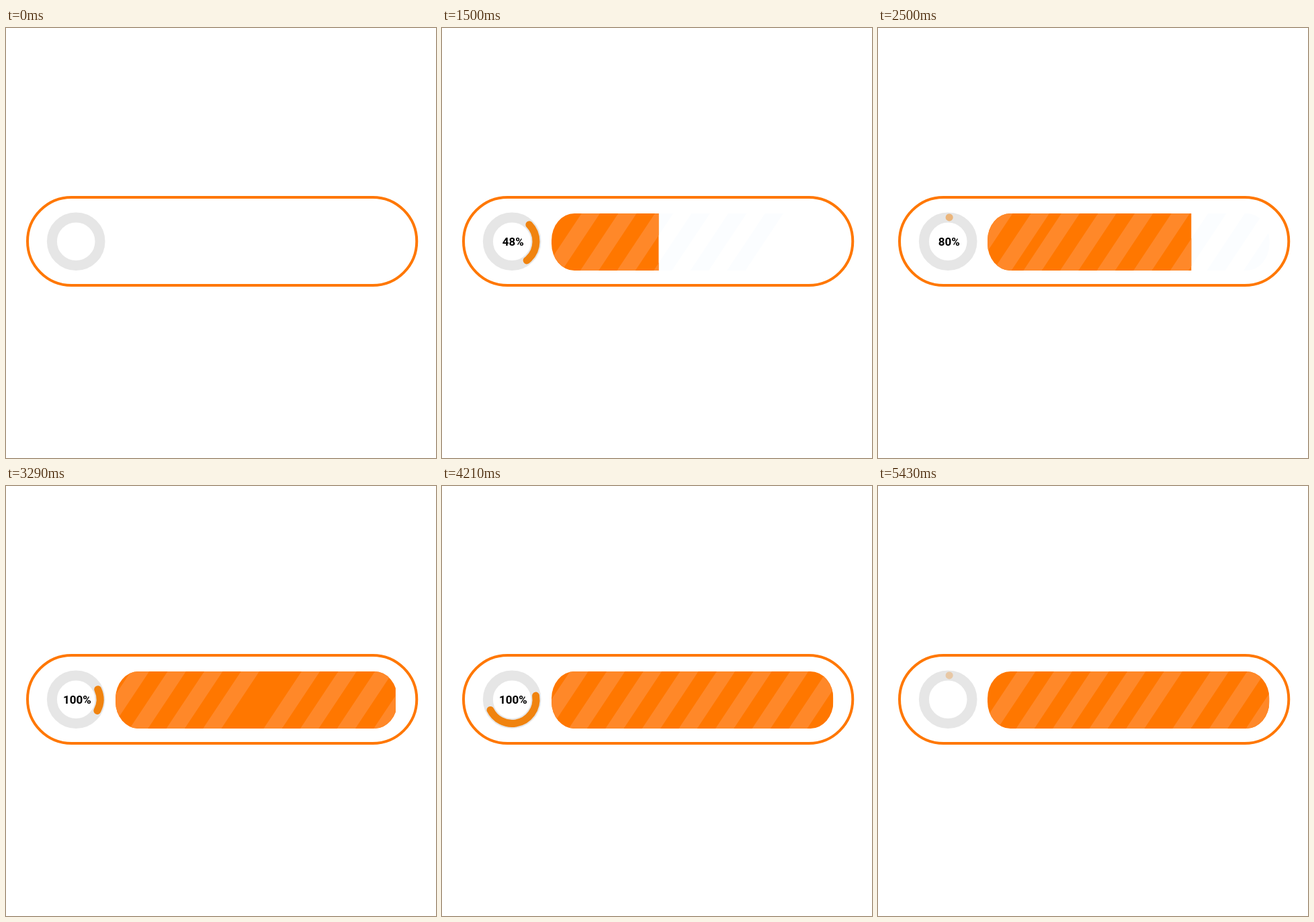
Animation, 640 px wide and 640 px high, one loop 5.5 s. Source, as an HTML page with a canvas:

```html
<!DOCTYPE html>
<html lang="en">
<head>
<meta charset="utf-8">
<title>Loading bar</title>
<style>
  html, body { margin: 0; width: 100%; height: 100%; overflow: hidden; background: #fff; }
  canvas { display: block; width: 640px; height: 640px; }
</style>
</head>
<body>
<canvas id="stage" width="640" height="640"></canvas>
<script>
const ctx = document.getElementById('stage').getContext('2d');
const LOOP = 5500, SPIN = 3000;
const ORANGE = '#ff7700';
const BAR = { x: 163, y: 276, w: 419.5, h: 85 };
const RING = { x: 104.2, y: 317.7, r: 35.8 };
const STRIPE = { step: 54.6, width: 27.3, slant: 56.5, count: 9 };

// Top right end of each stripe group over time: [ms, x]
const GROUPS = [
  [[0, 200], [1500, 508], [2500, 737], [3290, 904]],
  [[2500, 255], [3290, 377], [4210, 600], [4930, 800], [5430, 959]],
  [[4930, 273], [5430, 453]]
];

const clamp = v => Math.min(1, Math.max(0, v));
const ease = (t, a, b) => (1 - Math.cos(Math.PI * clamp((t - a) / (b - a)))) / 2;

// Linear between points, continued beyond both ends
function track(points, t) {
  let i = 1;
  while (i < points.length - 1 && t > points[i][0]) i++;
  const [t0, x0] = points[i - 1], [t1, x1] = points[i];
  return x0 + (x1 - x0) * (t - t0) / (t1 - t0);
}

function barPath() {
  const corner = { x: 34, y: 40 };
  ctx.beginPath();
  ctx.roundRect(BAR.x, BAR.y, BAR.w, BAR.h, corner);
}

function stripes(t, color) {
  const bottom = BAR.y + BAR.h;
  ctx.fillStyle = color;
  ctx.beginPath();
  for (const group of GROUPS) {
    const end = track(group, t);
    for (let i = 0; i < STRIPE.count; i++) {
      const right = end - i * STRIPE.step, left = right - STRIPE.width;
      ctx.moveTo(left, BAR.y);
      ctx.lineTo(right, BAR.y);
      ctx.lineTo(right - STRIPE.slant, bottom);
      ctx.lineTo(left - STRIPE.slant, bottom);
      ctx.closePath();
    }
  }
  ctx.fill();
}

function drawBar(t) {
  const width = Math.min(BAR.w, 159.5 + 0.1438 * (t - 1500));
  ctx.save();
  barPath();
  ctx.clip();
  if (t > 390) stripes(t, '#fbfdff');
  if (width > 0) {
    ctx.beginPath();
    ctx.rect(BAR.x, BAR.y, width, BAR.h);
    ctx.clip();
    ctx.fillStyle = ORANGE;
    ctx.fillRect(BAR.x, BAR.y, BAR.w, BAR.h);
    stripes(t, '#ff8829');
  }
  ctx.restore();
}

function drawFrame() {
  ctx.lineWidth = 4;
  ctx.strokeStyle = ORANGE;
  ctx.beginPath();
  ctx.roundRect(32, 252, 579.3, 131, 65.5);
  ctx.stroke();
}

function drawRing(t) {
  ctx.lineWidth = 15;
  ctx.strokeStyle = '#e6e6e6';
  ctx.beginPath();
  ctx.arc(RING.x, RING.y, RING.r, 0, 2 * Math.PI);
  ctx.stroke();

  // The arc runs out clockwise, then draws back to the top
  const p = t % SPIN;
  const head = 357 * (ease(p, 95, 603) - ease(p, 603, 2175));
  const tail = 95 * (ease(p, 95, 420) - ease(p, 892, 2037));
  const fade = t < SPIN ? (2700 - t) / 400 : (5550 - t) / 400;
  const alpha = Math.min(clamp(p / 95), clamp(fade));
  if (alpha <= 0) return;

  const angle = deg => (deg - 87) * Math.PI / 180;
  ctx.save();
  ctx.globalAlpha = alpha;
  ctx.lineWidth = 11;
  ctx.lineCap = 'round';
  ctx.strokeStyle = '#f0830f';
  ctx.beginPath();
  ctx.arc(RING.x, RING.y, RING.r, angle(tail), angle(Math.max(head, tail + 0.2)));
  ctx.stroke();
  ctx.restore();
}

function drawPercent(t) {
  if (t < 60 || t > 5400) return;
  ctx.font = '700 17px Roboto, "Liberation Sans", sans-serif';
  ctx.textAlign = 'center';
  ctx.fillStyle = '#000';
  ctx.fillText(Math.min(100, Math.round(t * 0.032)) + '%', 105.8, 324);
}

function draw(now) {
  const t = now % LOOP;
  ctx.fillStyle = '#fff';
  ctx.fillRect(0, 0, 640, 640);
  drawFrame();
  drawBar(t);
  drawRing(t);
  drawPercent(t);
}

let begin = null;
function tick(now) {
  if (begin === null) begin = now;
  draw(now - begin);
  requestAnimationFrame(tick);
}
draw(0);
requestAnimationFrame(tick);
</script>
</body>
</html>
```
